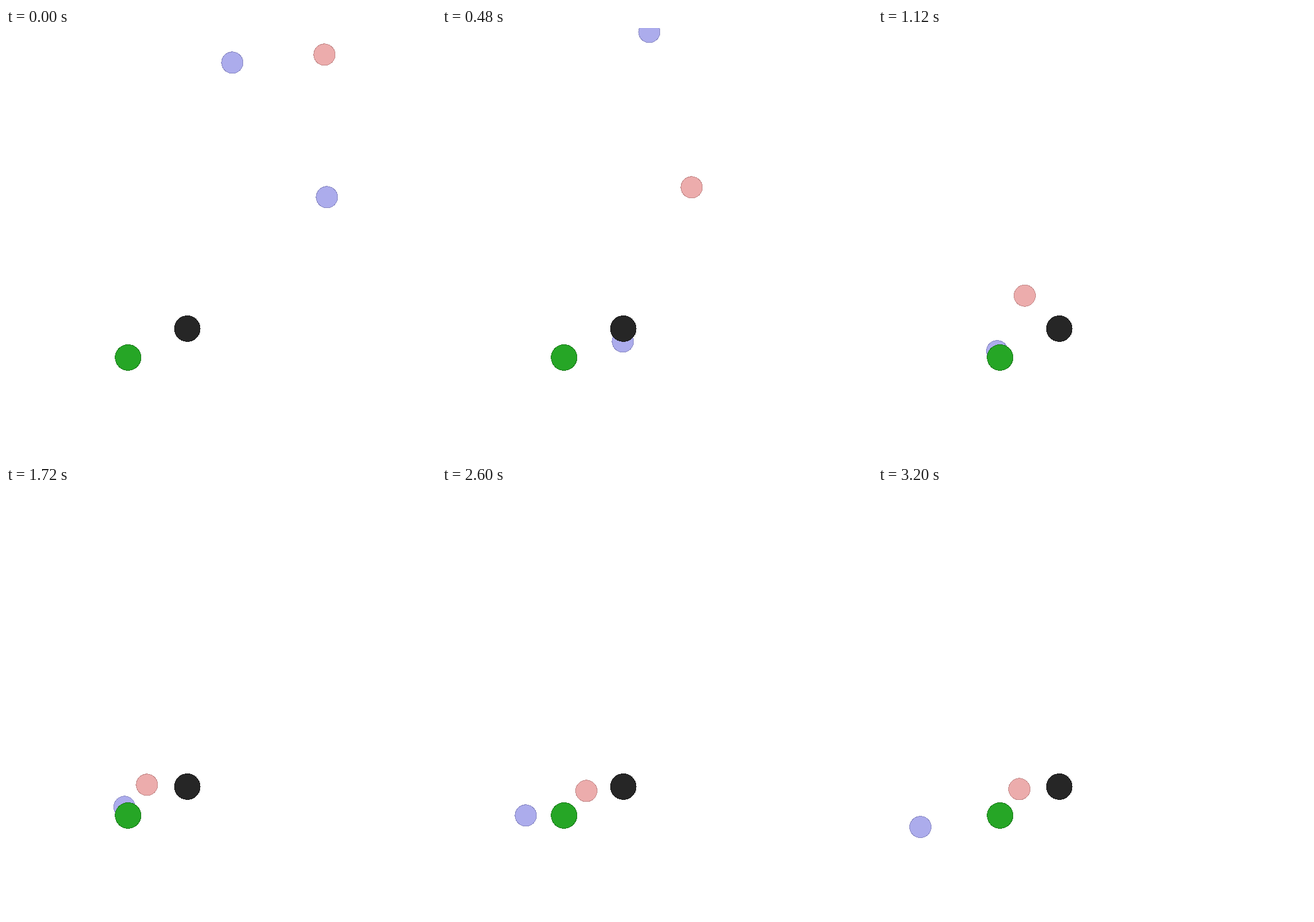
These frames come from a looping animation (700x700 px, 3240 ms). An HTML page:

```html
<!DOCTYPE html>
<html lang="en">
<head>
<meta charset="utf-8">
<title>Particles</title>
<style>
  html, body { margin: 0; width: 100%; height: 100%; overflow: hidden; background: #fff; }
  svg { display: block; width: 100vw; height: 100vh; }
</style>
</head>
<body>
<svg viewBox="0 0 700 700" shape-rendering="crispEdges"><g id="stage" transform="translate(.4 .4)"></g></svg>
<script>
const STEP = 40, STEPS = 81, SIDES = 30;
const stage = document.getElementById('stage');

function disc(radius, fill, edge) {
  const shape = document.createElementNS('http://www.w3.org/2000/svg', 'polygon');
  const points = Array.from({ length: SIDES }, (_, i) => {
    const angle = i * 2 * Math.PI / SIDES;
    return [radius * Math.cos(angle), radius * Math.sin(angle)];
  });
  shape.setAttribute('points', points.join(' '));
  shape.setAttribute('fill', fill);
  shape.setAttribute('stroke', edge);
  stage.append(shape);
  return shape;
}

const agent = (fill, edge) => disc(17.5, fill, edge);
const landmark = (fill, edge) => disc(21, fill, edge);

function place(shape, [x, y]) {
  shape.setAttribute('transform', `translate(${x} ${y})`);
}

// Smooth path through [step, x, y] waypoints, starting at rest and never overshooting.
function path(...points) {
  const last = points.length - 1;
  const rate = (i, axis) =>
    (points[i + 1][axis] - points[i][axis]) / (points[i + 1][0] - points[i][0]);
  const slope = (i, axis) => {
    if (i === 0) return 0;
    const before = rate(i - 1, axis);
    if (i === last) return before;
    const after = rate(i, axis);
    return before * after <= 0 ? 0 : 2 * before * after / (before + after);
  };
  return n => {
    let i = 0;
    while (i < last - 1 && n >= points[i + 1][0]) i++;
    const a = points[i], b = points[i + 1], span = b[0] - a[0];
    const u = (n - a[0]) / span, v = 1 - u;
    return [1, 2].map(axis =>
      a[axis] * v * v * (1 + 2 * u) + b[axis] * u * u * (3 - 2 * u) +
      span * u * v * (slope(i, axis) * v - slope(i + 1, axis) * u));
  };
}

// Constant push against drag: speed approaches (vx, vy).
const drift = (x, y, vx, vy) => n => {
  const travel = n - 3 * (1 - 0.75 ** n);
  return [x + vx * travel, y + vy * travel];
};

const BLUE = ['#acacec', '#8a8ac4'], RED = ['#ecacac', '#c48a8a'];

const chaser = path(
  [0, 518, 43], [12, 406, 259], [28, 238.5, 435.3], [43, 229, 486],
  [52, 232.5, 495], [65, 234.6, 496], [80, 229.7, 493]);

const runner = path(
  [0, 522, 275], [12, 294, 510], [28, 193.5, 525.7], [43, 192.5, 522],
  [52, 183, 527], [56, 157.5, 533.5], [65, 136, 536], [80, 68.7, 554.7]);

const movers = [
  [agent(...RED), chaser],
  [agent(...BLUE), drift(368, 56, -3.4, -5.5)],
  [agent(...BLUE), runner]
];

place(landmark('#26a626', '#1c7c1c'), [198.3, 536]);
place(landmark('#262626', '#1c1c1c'), [294.7, 489]);

function draw(time) {
  const n = Math.floor(time / STEP) % STEPS;
  for (const [shape, motion] of movers) place(shape, motion(n));
}

const start = performance.now();
function tick() {
  draw(performance.now() - start);
  requestAnimationFrame(tick);
}
tick();
</script>
</body>
</html>
```
